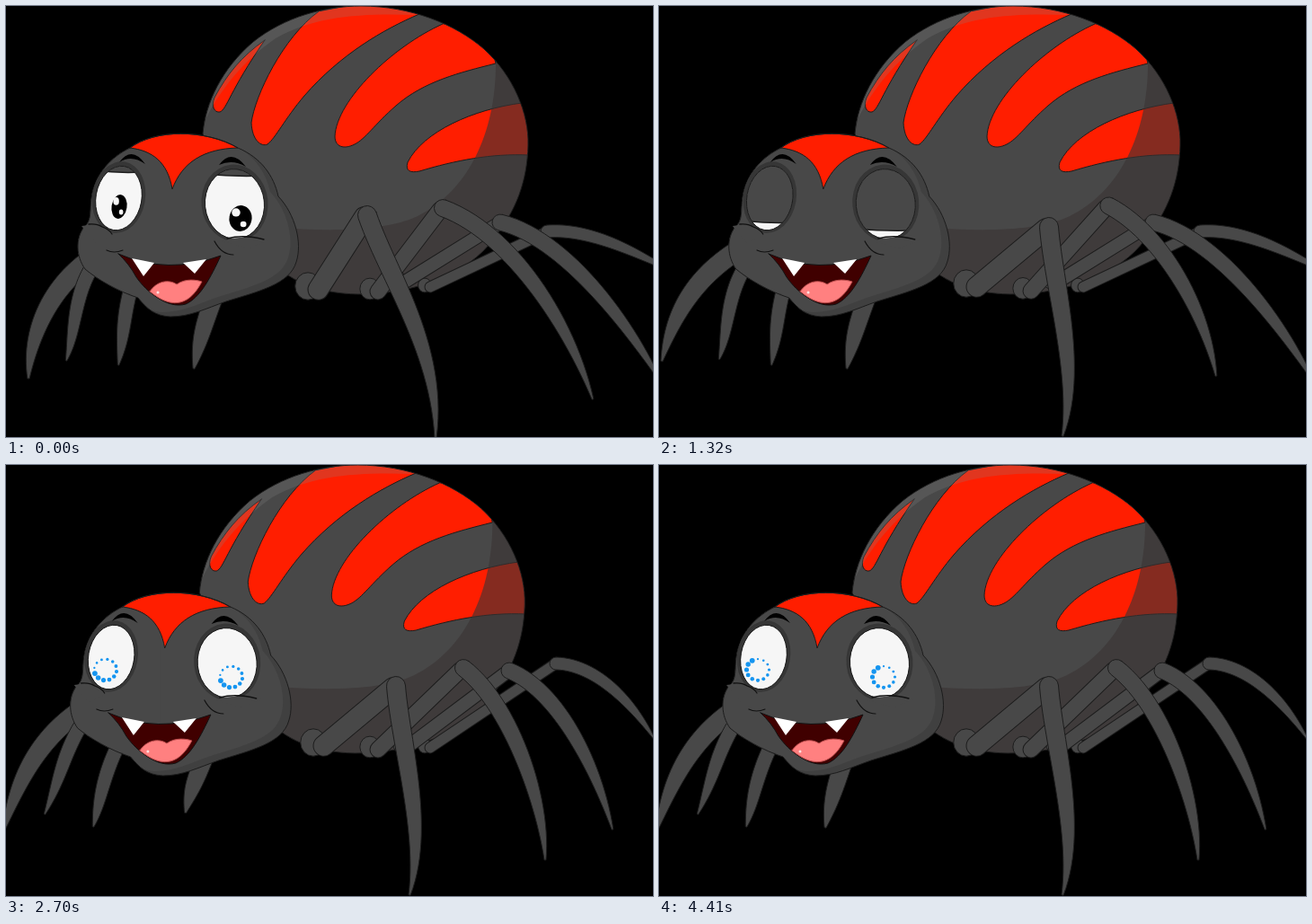
Animation, 720 px wide and 480 px high, one loop 4440 ms. Source, as an HTML page with a canvas:

```html
<!DOCTYPE html>
<html lang="en">
<head>
<meta charset="utf-8">
<title>Spider</title>
<style>
html, body { margin: 0; width: 100%; height: 100%; overflow: hidden; background: #000; }
canvas { display: block; width: 720px; height: 480px; }
</style>
</head>
<body>
<canvas id="stage" width="720" height="480"></canvas>
<script>
const ctx = document.getElementById('stage').getContext('2d');
const LOOP = 4440;
const GREY = '#484848', LINE = '#1c1c1c', RED = '#ff1e00', WHITE = '#f6f6f6';

const mix = (a, b, k) => a + (b - a) * k;
const clamp = v => Math.max(0, Math.min(1, v));
const smooth = u => u * u * (3 - 2 * u);

function keyed(t, keys) {
  for (let i = 1; i < keys.length; i++) {
    const [t0, a] = keys[i - 1], [t1, b] = keys[i];
    if (t < t1) return mix(a, b, clamp((t - t0) / (t1 - t0)));
  }
  return keys[keys.length - 1][1];
}

const abdomen = new Path2D('M219 142C222 108 240 70 275 40C310 12 355 0 395 0C450 0 500 20 532 48C565 78 582 120 581 155C580 195 568 228 542 260C515 298 455 321 392 321C345 320 315 306 290 280Z');
const abdomenShade = new Path2D('M290 246C355 251 420 252 458 234C515 206 546 140 545 60L600 60V340H290Z');
const abdomenShine = new Path2D('M215 142C232 100 262 62 300 36C345 10 400 8 458 10L400 -10H300L215 60Z');
const stripes = [
  'M288 38C262 56 246 76 232 102C228 112 232 119 238 118C246 115 248 96 288 38Z',
  'M348 6C308 35 277 100 273 130C274 150 284 157 291 154C300 147 310 126 332 100C372 54 420 26 460 9L410 -6Z',
  'M486 20C430 45 368 105 366 145C366 157 376 160 388 154C400 148 410 132 434 111C465 84 505 74 545 64L535 20Z',
  'M574 108C520 115 464 140 447 174C444 184 450 186 460 184C500 172 540 164 582 166L600 130Z'
].map(d => new Path2D(d));

const head = new Path2D('M138 158C165 137 222 137 258 158C284 169 298 189 303 212C322 232 330 264 323 285C316 310 280 318 245 329C222 337 205 346 183 346C165 345 157 337 147 325C125 318 101 304 88 293C78 279 77 259 87 246C96 239 93 227 95 214C99 187 117 168 138 158Z');
const cap = new Path2D('M138 158C165 137 222 137 258 158C220 159 196 174 185 204C180 174 163 161 138 158Z');
const brows = new Path2D('M126 174Q140 155 155 176Q140 165 126 174ZM237 177Q251 158 267 179Q252 170 237 177Z');
const mouth = new Path2D('M125 276Q180 300 239 278C228 302 216 325 200 332C180 338 156 318 145 302Q137 287 125 276Z');
const tongue = new Path2D('M160 318C168 306 181 304 190 310C200 303 212 305 218 307C206 330 188 341 160 318Z');
const fangs = new Path2D('M140 281L165 286L153 301ZM197 286L223 282L210 298Z');
const smile = new Path2D('M112 272Q120 276 130 272M232 262Q240 277 253 277');
const cheeks = new Path2D('M92 243Q101 242 107 246Q114 248 118 254M246 259Q264 254 287 260');

// Each pose is a cubic from knee to foot: knee, two handles, foot.
const rightLegs = [
  { base: [466, 311, 466, 313], r: 7, w: 12, start: 1850, time: 700, lift: 45,
    from: [602, 251, 645, 248, 690, 268, 745, 298], to: [612, 221, 655, 222, 695, 262, 722, 306] },
  { base: [436, 305, 440, 311], r: 9, w: 15, start: 1480, time: 720, lift: 56,
    from: [550, 241, 620, 258, 690, 350, 729, 419], to: [560, 229, 612, 250, 655, 330, 675, 406] },
  { base: [405, 315, 405, 314], r: 9.5, w: 18, start: 900, time: 720, lift: 28,
    from: [486, 225, 560, 252, 625, 350, 653, 438], to: [509, 226, 560, 265, 598, 370, 600, 440] },
  { base: [336, 312, 342, 309], r: 10.5, w: 23, start: 400, time: 770, lift: 30,
    from: [402, 233, 425, 300, 482, 380, 478, 481], to: [434, 246, 439, 310, 468, 405, 449, 479] }
];
const leftLegs = [
  { r: 11, start: 900, time: 600, lift: 17,
    from: [94, 282, 48, 315, 27, 365, 25, 415], to: [82, 274, 33, 308, 12, 355, -3, 408] },
  { r: 8, start: 1300, time: 650, lift: 16,
    from: [95, 292, 75, 325, 77, 365, 67, 395], to: [82, 292, 63, 325, 60, 350, 43, 389] },
  { r: 8, start: 1850, time: 700, lift: 13,
    from: [138, 318, 130, 350, 131, 370, 125, 400], to: [123, 316, 107, 350, 104, 378, 97, 403] },
  { r: 10, start: 2400, time: 700, lift: 17,
    from: [231, 326, 220, 355, 215, 375, 209, 404], to: [207, 326, 197, 355, 191, 375, 185, 404] }
];

function paint(path, fill, line, width = 1) {
  if (fill) { ctx.fillStyle = fill; ctx.fill(path); }
  if (line) { ctx.strokeStyle = line; ctx.lineWidth = width; ctx.stroke(path); }
}

function ellipse(x, y, rx, ry, angle = 0) {
  const p = new Path2D();
  p.ellipse(x, y, rx, ry, angle, 0, Math.PI * 2);
  return p;
}

// Tapered limb with a round knee.
function limb([x0, y0, x1, y1, x2, y2, x3, y3], r) {
  const right = [], left = [];
  for (let i = 0; i <= 28; i++) {
    const t = i / 28, s = 1 - t;
    const x = s*s*s*x0 + 3*s*s*t*x1 + 3*s*t*t*x2 + t*t*t*x3;
    const y = s*s*s*y0 + 3*s*s*t*y1 + 3*s*t*t*y2 + t*t*t*y3;
    const dx = s*s*(x1 - x0) + 2*s*t*(x2 - x1) + t*t*(x3 - x2);
    const dy = s*s*(y1 - y0) + 2*s*t*(y2 - y1) + t*t*(y3 - y2);
    const k = r * (1 - 0.9 * t * t * t) / Math.hypot(dx, dy);
    right.push([x + dy * k, y - dx * k]);
    left.unshift([x - dy * k, y + dx * k]);
  }
  const p = new Path2D();
  right.concat(left).forEach(([x, y]) => p.lineTo(x, y));
  const a = Math.atan2(y1 - y0, x1 - x0);
  p.arc(x0, y0, r, a + Math.PI / 2, a + Math.PI * 1.5);
  p.closePath();
  paint(p, GREY, LINE);
}

function bar(x0, y0, x1, y1, width) {
  const p = new Path2D();
  p.moveTo(x0, y0);
  p.lineTo(x1, y1);
  ctx.lineCap = 'round';
  paint(p, null, LINE, width + 1);
  paint(p, null, GREY, width - 1);
}

function drawLeg(leg, t) {
  const u = clamp((t - leg.start) / leg.time), e = smooth(u);
  const lift = leg.lift * Math.sin(Math.PI * u);
  const share = [0.12, 0.25, 0.8, 1];
  const pose = leg.from.map((v, i) =>
    mix(v, leg.to[i], e) - (i % 2 ? lift * share[i >> 1] : 0));
  if (leg.base) {
    const [ax, ay, bx, by] = leg.base;
    const x = mix(ax, bx, e), y = mix(ay, by, e), w = leg.w;
    paint(ellipse(x, y, w * 0.62, w * 0.66), GREY, LINE);
    bar(x + w * 0.5, y + w * 0.16, pose[0] - 3, pose[1] + 2, w);
  }
  limb(pose, leg.r);
}

function drawAbdomen(shift) {
  ctx.save();
  ctx.translate(shift, 0);
  paint(abdomen, GREY);
  ctx.save();
  ctx.clip(abdomen);
  stripes.forEach(s => paint(s, RED, LINE));
  paint(abdomenShade, 'rgba(58,53,53,.62)');
  paint(abdomenShine, 'rgba(130,130,130,.24)');
  ctx.restore();
  paint(abdomen, null, LINE);
  ctx.restore();
}

function drawSpinner(x, y, t) {
  const turn = (t - 1710) / 405 * Math.PI * 2;
  ctx.fillStyle = '#1595f0';
  for (let i = 0; i < 12; i++) {
    const a = turn - i * Math.PI / 6;
    ctx.beginPath();
    ctx.arc(x + 12.5 * Math.cos(a), y + 11.8 * Math.sin(a), 2.9 - i * 0.16, 0, Math.PI * 2);
    ctx.fill();
  }
}

function drawPupil(x, y, rx, ry) {
  paint(ellipse(x, y, rx, ry, 0.15), '#000');
  paint(ellipse(x - rx * 0.4, y - ry * 0.45, rx * 0.38, ry * 0.32), WHITE);
  paint(ellipse(x + rx * 0.25, y + ry * 0.45, rx * 0.27, ry * 0.22), WHITE);
}

function drawEye(eye, open, t) {
  const { x, y, rx, ry, tilt } = eye;
  const shape = ellipse(x, y, rx, ry, tilt);
  paint(ellipse(x, y - 1, rx + 4, ry + 4, tilt), '#363636');
  ctx.save();
  ctx.clip(shape);
  paint(shape, WHITE);
  if (t < 1180) drawPupil(...eye.pupil);
  else drawSpinner(...eye.spinner, t);
  if (open < 1) {
    const lidY = y - ry + (1 - open) * ry * 2;
    const lid = new Path2D();
    lid.moveTo(x - rx - 6, lidY - 1);
    lid.quadraticCurveTo(x, lidY + 3, x + rx + 6, lidY + 1);
    lid.lineTo(x + rx + 6, y - ry - 9);
    lid.lineTo(x - rx - 6, y - ry - 9);
    lid.closePath();
    paint(lid, GREY, LINE, 1.5);
  }
  ctx.restore();
  paint(shape, null, LINE);
}

const eyes = [
  { x: 125.5, y: 214, rx: 25.5, ry: 36, tilt: 0.17, pupil: [126, 223.5, 8.5, 13.5], spinner: [119, 228] },
  { x: 254.5, y: 220.5, rx: 33, ry: 39, tilt: -0.1, pupil: [261, 236.5, 12.5, 14.5], spinner: [259, 236] }
];

function drawHead(shift, open, t) {
  ctx.save();
  ctx.translate(shift, 0);
  paint(head, '#404040');
  ctx.save();
  ctx.clip(head);
  ctx.translate(-9, -5);
  paint(head, GREY);
  ctx.restore();
  ctx.save();
  ctx.clip(head);
  paint(new Path2D('M70 130H180V320H70Z'), GREY);
  ctx.restore();
  paint(cap, RED, LINE);
  paint(head, null, LINE);
  eyes.forEach(eye => drawEye(eye, open, t));
  paint(new Path2D('M84 245Q101 242 108 247Q115 249 118 256L100 264ZM240 262Q264 254 292 261L270 270Z'), GREY);
  paint(cheeks, null, '#111', 1.3);
  paint(brows, '#000');

  // The mouth drifts slightly further than the head.
  ctx.translate(shift / 3, 0);
  paint(mouth, '#400000', '#111');
  ctx.save();
  ctx.clip(mouth);
  paint(tongue, '#ff8080', '#b84a4a');
  ctx.restore();
  paint(ellipse(169, 319, 1.5, 1.5), '#ffe0e0');
  paint(fangs, '#fff');
  paint(smile, null, '#111', 1.2);
  ctx.restore();
}

function draw(t) {
  const drift = clamp((t - 820) / 2030);
  const open = keyed(t, [[0, .92], [120, 1], [880, 1], [1180, 0], [1710, .53], [2220, .9], [2500, 1]]);
  ctx.fillStyle = '#000';
  ctx.fillRect(0, 0, 720, 480);
  drawAbdomen(-4 * drift);
  rightLegs.forEach(leg => drawLeg(leg, t));
  leftLegs.forEach(leg => drawLeg(leg, t));
  drawHead(-9 * drift, open, t);
}

const begin = performance.now();
function tick() {
  const t = (performance.now() - begin) % LOOP;
  draw(Math.floor(t / 30) * 30);
  requestAnimationFrame(tick);
}
tick();
</script>
</body>
</html>
```
